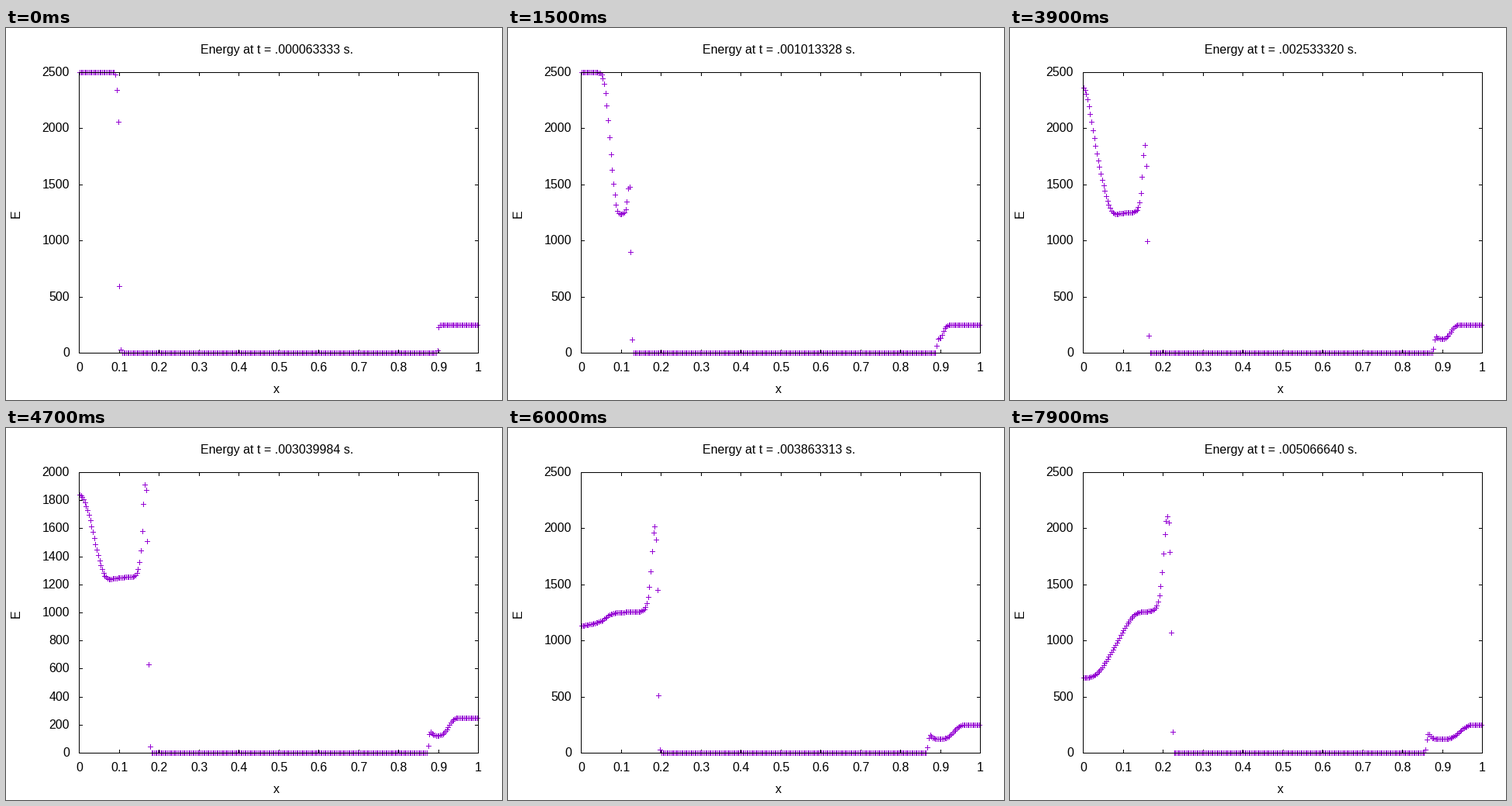
These frames come from a looping animation (640 px wide and 480 px high, 8000 ms). A matplotlib script:

```python
import numpy as np
import matplotlib.pyplot as plt
from matplotlib.animation import FuncAnimation
from matplotlib.collections import LineCollection

W, H, DPI = 640, 480, 100
PX = 72 / DPI
LEFT, RIGHT, TOP, BOTTOM = 94, 609, 57, 419
CELLS, FRAMES, SUBSTEPS = 300, 80, 2
GAMMA = 1.4
DT = 0.000063333

plt.rcParams["font.family"] = "Liberation Sans"
plt.rcParams["font.size"] = 16 * PX


# Two interacting blast waves: 1D Euler equations between solid walls

def to_cons(w):
    rho, u, p = w
    return np.array([rho, rho * u, p / (GAMMA - 1) + 0.5 * rho * u * u])


def to_prim(q):
    rho, m, e = q
    u = m / rho
    return np.array([rho, u, np.maximum((GAMMA - 1) * (e - 0.5 * m * u), 1e-6)])


def minmod(a, b):
    return np.where(a * b > 0, np.sign(a) * np.minimum(abs(a), abs(b)), 0)


def hlle(wl, wr):
    ql, qr = to_cons(wl), to_cons(wr)

    def flux(w, q):
        return np.array([q[1], q[1] * w[1] + w[2], (q[2] + w[2]) * w[1]])

    cl, cr = (np.sqrt(GAMMA * w[2] / w[0]) for w in (wl, wr))
    sl, sr = np.sqrt(wl[0]), np.sqrt(wr[0])
    hl, hr = (ql[2] + wl[2]) / wl[0], (qr[2] + wr[2]) / wr[0]
    u = (sl * wl[1] + sr * wr[1]) / (sl + sr)
    h = (sl * hl + sr * hr) / (sl + sr)
    c = np.sqrt((GAMMA - 1) * (h - 0.5 * u * u))
    lo = np.minimum(0, np.minimum(wl[1] - cl, u - c))
    hi = np.maximum(0, np.maximum(wr[1] + cr, u + c))
    return (hi * flux(wl, ql) - lo * flux(wr, qr) + lo * hi * (qr - ql)) / (hi - lo)


def rate(q):
    w = to_prim(q)
    w = np.hstack([w[:, 1::-1], w, w[:, :-3:-1]])
    w[1, :2] *= -1
    w[1, -2:] *= -1
    d = np.diff(w, axis=1)
    half = 0.5 * minmod(d[:, :-1], d[:, 1:])
    mid = w[:, 1:-1]
    f = hlle((mid + half)[:, :-1], (mid - half)[:, 1:])
    return -np.diff(f, axis=1) * CELLS


def simulate():
    x = (np.arange(CELLS) + 0.5) / CELLS
    p = np.where(x < 0.1, 1000.0, np.where(x > 0.9, 100.0, 0.01))
    q = to_cons(np.array([np.ones(CELLS), np.zeros(CELLS), p]))
    h = DT / SUBSTEPS
    energies = []
    for _ in range(FRAMES):
        for _ in range(SUBSTEPS):
            q1 = q + h * rate(q)
            q = 0.5 * (q + q1 + h * rate(q1))
        energies.append(q[2].copy())
    return x, energies


X, ENERGY = simulate()

# Drawing in pixel units, y downwards

fig = plt.figure(figsize=(W / DPI, H / DPI), dpi=DPI, facecolor="white")
ax = fig.add_axes([0, 0, 1, 1])
ax.set_xlim(0, W)
ax.set_ylim(H, 0)
ax.axis("off")


def nearest(v):
    return np.floor(np.asarray(v) + 0.5)


def hline(x0, x1, y):
    return [(x0, y + 0.5), (x1 + 1, y + 0.5)]


def vline(x, y0, y1):
    return [(x + 0.5, y0), (x + 0.5, y1 + 1)]


def strokes(color, z, segs=()):
    lines = LineCollection(list(segs), colors=color, linewidths=PX, zorder=z)
    lines.set_snap(False)
    return ax.add_collection(lines, autolim=False)


def label(x, y, s, ha="center", **kw):
    return ax.text(x, y, s, ha=ha, va="baseline", color="black", **kw)


x_ticks = []
for k in range(11):
    px = nearest(LEFT + (RIGHT - LEFT) * k / 10)
    x_ticks += [vline(px, BOTTOM - 4, BOTTOM), vline(px, TOP, TOP + 4)]
    label(px + 0.5, 443, f"{k / 10:g}")

strokes("black", 1, x_ticks)
y_ticks = strokes("black", 1)
points = strokes("#9400d3", 2)
strokes("black", 3, [hline(LEFT, RIGHT, TOP), hline(LEFT, RIGHT, BOTTOM),
                     vline(LEFT, TOP, BOTTOM), vline(RIGHT, TOP, BOTTOM)])

title = label(349.5, 33, "")
label(349, 471, "x")
ax.text(13, 239.5, "E", rotation=90, ha="center", va="center")
y_labels = [label(82, 0, "", ha="right") for _ in range(11)]
PXS = nearest(LEFT + X * (RIGHT - LEFT))


def draw(i):
    e = ENERGY[i]
    top, step = (2500, 500) if e.max() > 2000 else (2000, 200)

    def to_y(v):
        return nearest(BOTTOM - (BOTTOM - TOP) * v / top)

    ticks = []
    for k, text in enumerate(y_labels):
        v = k * step
        text.set_visible(v <= top)
        if v <= top:
            y = to_y(v)
            text.set_text(str(v))
            text.set_y(y + 5)
            ticks += [hline(LEFT, LEFT + 4, y), hline(RIGHT - 4, RIGHT, y)]
    y_ticks.set_segments(ticks)

    plus = []
    for px, py in zip(PXS, to_y(e)):
        plus += [hline(px - 3, px + 3, py), vline(px, py - 3, py + 3)]
    points.set_segments(plus)
    title.set_text(f"Energy at t = {(i + 1) * DT:.9f} s.".replace("0.", ".", 1))
    return [title, points, y_ticks, *y_labels]


anim = FuncAnimation(fig, draw, frames=FRAMES, interval=100, repeat=True,
                     repeat_delay=0, blit=False)
plt.show()
```
